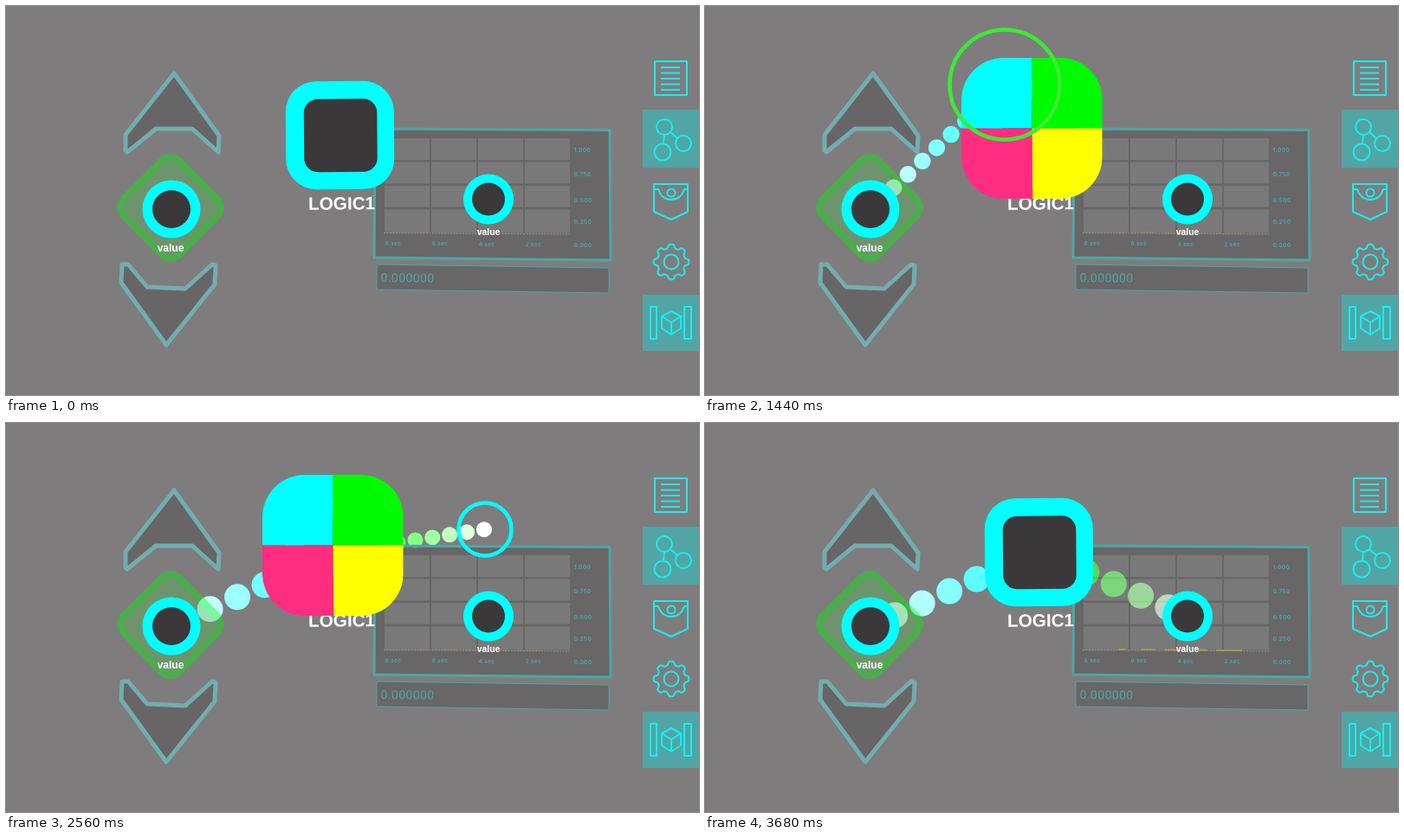
Recreate the animation shown at these times as an HTML page. Size 800x450 px, loop 3760 ms.

```html
<!DOCTYPE html>
<html lang="en">
<head>
<meta charset="utf-8">
<title>Node linking</title>
<style>
html, body { margin: 0; width: 100%; height: 100%; overflow: hidden; background: #7f7c7e; }
svg { display: block; width: 800px; height: 450px; }
.name { font-family: "Liberation Sans", Arial, sans-serif; font-weight: bold; fill: #fff; text-anchor: middle; }
.tick { font: bold 6.6px Inter, sans-serif; letter-spacing: .3px; fill: #4fa3a2; }
.arrow { fill: #686567; stroke: #72aeae; stroke-width: 5; stroke-linejoin: round; }
.icon { fill: none; stroke: #18eeee; stroke-width: 2; stroke-linejoin: round; }
.core { fill: #3b383a; }
</style>
</head>
<body>
<svg viewBox="0 0 800 450">
  <rect width="800" height="450" fill="#7f7c7e"/>

  <path class="arrow" d="M194 78 246 150 245 169 215 142H173L140 169 138 167V149Z"/>
  <path class="arrow" d="M185 392 133 320 134 299 141 299 163 325 207 327 238 299 242 300 241 322Z"/>

  <g id="linkA"></g>
  <g id="linkB"></g>

  <g stroke-linejoin="round" opacity=".4">
    <path d="M190 189 234 233 190 278 146 233Z" fill="#00f700" stroke="#00f700" stroke-width="36"/>
    <path d="M190 189 234 233 190 278 146 233Z" fill="#55b955" stroke="#55b955" stroke-width="20"/>
  </g>

  <path d="M426 142 697 143.500 698 294 425 291Z" fill="#000" fill-opacity=".18" stroke="#4fa6a5" stroke-width="3"/>
  <g id="cells" fill="#fff" fill-opacity=".12"></g>
  <path d="M436 262.500 651 264" stroke="#9a9899" stroke-dasharray="2 1.500"/>
  <path id="trace" d="M477 262H485M503 262H520M530 262.500H545M568 262.500H580M590 263H620" stroke="#b5ae38" stroke-width="1.300"/>
  <g id="ticks"></g>
  <path d="M428 299 696 303V332L428 328Z" fill="#686667" stroke="#4fa6a5"/>
  <text x="432.500" y="319" transform="rotate(.6 432 319)" fill="#4fa6a5" font-family="Roboto, sans-serif" font-size="14" letter-spacing=".4">0.000000</text>

  <path d="M735 120H800V187H735ZM735 334H800V399H735Z" fill="#52a5a5"/>
  <g class="icon">
    <path d="M749 64H786V103H749ZM756 71H778M756 77.500H778M756 84H778M756 90.500H778M756 97H778"/>
    <circle cx="760" cy="140" r="9"/>
    <circle cx="782" cy="159" r="9"/>
    <circle cx="758" cy="169" r="9.500"/>
    <path d="M760 149 759 159M767 146 775 153"/>
    <path d="M748 206H787V238L768 247 748 238ZM748 212H753Q757 224 768 224T783 212H787"/>
    <circle cx="768" cy="216" r="4.500"/>
    <path id="gear"/>
    <circle cx="768" cy="296" r="8.500"/>
    <path d="M744 348H751V385H744ZM783 348H791V385H783Z"/>
    <path d="M768 353 779 359V373L768 380 757 373V359ZM757 359 768 366 779 359M768 366V380"/>
  </g>

  <circle id="nodeA" cx="191" cy="235" r="33.500"/>
  <circle class="core" cx="191" cy="235" r="22"/>
  <text class="name" x="190" y="283.500" font-size="12">value</text>

  <circle id="nodeB" cx="557" cy="223.500" r="29"/>
  <circle class="core" cx="557" cy="223.500" r="19"/>
  <text class="name" x="557" y="265" font-size="10.300">value</text>

  <g transform="rotate(-.4 385.500 149.500)">
    <rect x="323" y="87" width="125" height="125" rx="35" fill="#0ff"/>
    <rect class="core" x="344" y="107.500" width="84.500" height="84.500" rx="16"/>
    <text class="name" x="387" y="235.500" font-size="20.700">LOGIC1</text>
  </g>

  <g id="block">
    <path d="M0 0H-81.500V-33A49 49 0 0 1-33-81.500H0Z" fill="#0ff"/>
    <path d="M0 0V-81.500H33A48 48 0 0 1 81-33V0Z" fill="#00fb00"/>
    <path d="M0 0H-81.500V33A49 49 0 0 0-33 81.500H1Z" fill="#ff2d80"/>
    <path d="M0 0H81V33A48 48 0 0 1 33 81.500H1Z" fill="#ff0"/>
    <rect id="veil" x="-81.500" y="-81.500" width="162.500" height="163" rx="48.500" fill="#d7d7d7"/>
  </g>

  <circle id="ring" fill="none" stroke-width="4.500"/>
</svg>
<script>
const LOOP = 3760, STEP = 80;
const CYAN = '#00ffff', YELLOW = '#ffff00', GREEN = '#3ceb32';
const A = [191, 235], LOGIC = [385, 149], B = [557, 223];
const $ = id => document.getElementById(id);

function add(parent, tag, attrs, text) {
  const el = document.createElementNS('http://www.w3.org/2000/svg', tag);
  set(el, attrs);
  if (text) el.textContent = text;
  parent.append(el);
  return el;
}
function set(el, attrs) {
  for (const k in attrs) el.setAttribute(k, attrs[k]);
}

// chart grid and labels
const rows = [[153, 25], [180.5, 25], [208, 24.5], [235.5, 27]];
for (const [y, height] of rows)
  for (let i = 0; i < 4; i++) add($('cells'), 'rect', { x: 437 + 54 * i, y, width: 52, height });
['8 sec', '6 sec', '4 sec', '2 sec'].forEach((s, i) =>
  add($('ticks'), 'text', { class: 'tick', x: 437.5 + 54 * i, y: 277 + i * .4 }, s));
[['1.000', 169], ['0.750', 197], ['0.500', 226.5], ['0.250', 252], ['0.000', 279]].forEach(([s, y]) =>
  add($('ticks'), 'text', { class: 'tick', x: 655.5, y }, s));

// gear outline
let gear = '';
for (let i = 0; i < 160; i++) {
  const a = i / 160 * Math.PI * 2, r = 18.2 + 2.2 * Math.tanh(2 * Math.cos(8 * a));
  gear += (i ? 'L' : 'M') + (768 + r * Math.cos(a)).toFixed(1) + ' ' + (296 + r * Math.sin(a)).toFixed(1);
}
set($('gear'), { d: gear + 'Z' });

const dots = {};
for (const id of ['linkA', 'linkB'])
  dots[id] = Array.from({ length: 14 }, () => add($(id), 'circle', {}));

const clamp = v => Math.max(0, Math.min(1, v));
const mix = (a, b, f) => a + (b - a) * f;
const frac = v => v - Math.floor(v);
const dist = (p, q) => Math.hypot(p[0] - q[0], p[1] - q[1]);

// eased motion through [time, x, y] stops
function along(stops, t) {
  let [, x, y] = stops[0];
  for (let i = 1; i < stops.length; i++) {
    const [t0] = stops[i - 1], [t1, x1, y1] = stops[i];
    const p = clamp((t - t0) / (t1 - t0)), e = p * p * (3 - 2 * p);
    x = mix(x, x1, e);
    y = mix(y, y1, e);
  }
  return [x, y];
}

function drawLink(id, from, to, gap, phase, r, paint) {
  const len = from ? dist(from, to) : -9;
  dots[id].forEach((dot, i) => {
    const s = (i + phase) * gap, f = clamp(s / len), on = s <= len + 3;
    set(dot, { visibility: on ? 'visible' : 'hidden' });
    if (on) set(dot, { cx: mix(from[0], to[0], f), cy: mix(from[1], to[1], f), r, fill: paint(f) });
  });
}
const toCyan = f => `rgb(${255 * (1 - f)},255,255)`;
const toWhite = f => `rgb(${255 * f},255,${255 * f})`;

const pathA = [[840, 191, 235], [1360, 346, 91]];
const pathB = [[2240, 418, 118], [2560, 553, 123], [2880, 553, 220]];
const DROP_A = 1640, DROP_B = 3240;

function draw(t) {
  const dragA = t >= 800 && t < DROP_A, dragB = t >= 2240 && t < DROP_B;
  const cur = dragA ? along(pathA, t) : along(pathB, t);
  const slow = t / 166, flow = t / 250;

  let color = CYAN;
  if (dragA) color = dist(cur, A) < 45 ? YELLOW : cur[0] > 296 ? GREEN : CYAN;
  if (dragB) color = cur[0] < 458 ? YELLOW : dist(cur, B) < 55 ? GREEN : CYAN;
  set($('ring'), {
    cx: cur[0], cy: cur[1], r: color === CYAN ? 30.5 : 63.5, stroke: color,
    visibility: dragA || dragB ? 'visible' : 'hidden'
  });
  set($('nodeA'), { fill: dragA && color === YELLOW ? YELLOW : CYAN });
  set($('nodeB'), { fill: dragB && color === GREEN ? GREEN : CYAN });

  if (t >= DROP_A) drawLink('linkA', A, LOGIC, 34.45, frac(flow + .175), 15, toCyan);
  else drawLink('linkA', dragA && A, cur, 22.65, frac(slow + .935), 9.7, toCyan);
  if (t >= DROP_B) drawLink('linkB', LOGIC, B, 34.1, frac(flow + .05), 15, toWhite);
  else drawLink('linkB', dragB && LOGIC, cur, 20.1, frac(slow + .98), 9, toWhite);

  const ramp = (t0, t1) => clamp((t - t0) / 100) - clamp((t - t1) / 100);
  const open = ramp(760, DROP_A) + ramp(2140, DROP_B);
  set($('block'), {
    transform: `translate(377.5 141.5) scale(${.33 + .67 * open})`,
    opacity: open > 0 ? .42 + .58 * open : 0
  });
  set($('veil'), { opacity: .7 * (1 - open) });
  set($('trace'), { opacity: t < 1400 ? 0 : t < 2600 ? .2 : .85 });
}

function frame(now) {
  draw(Math.floor(now % LOOP / STEP) * STEP);
  requestAnimationFrame(frame);
}
draw(0);
requestAnimationFrame(frame);
</script>
</body>
</html>
```
